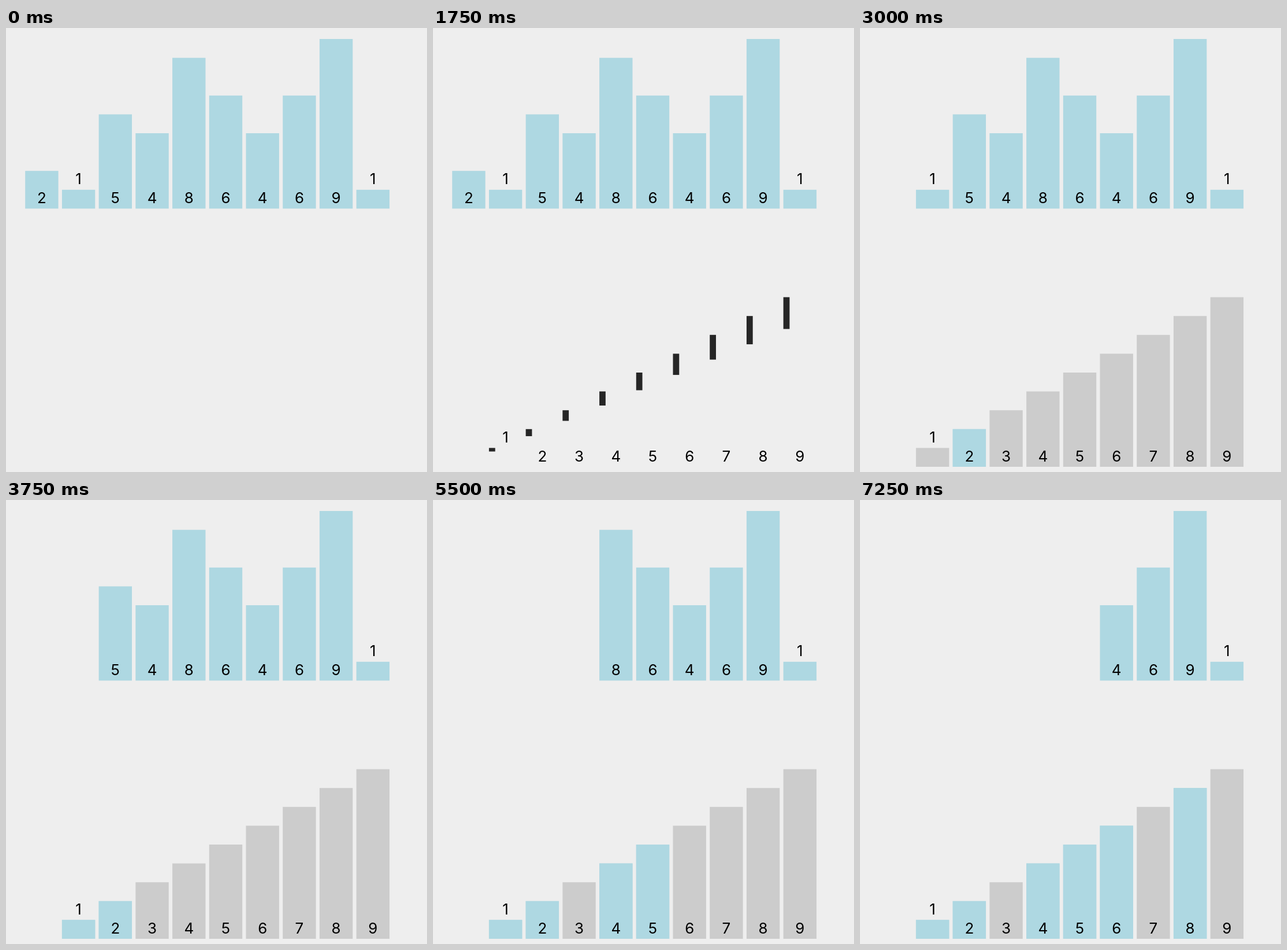
An HTML page for the animation above (8 s loop, 729 by 768 pixels).

```html
<!DOCTYPE html>
<html lang="en">
<head>
<meta charset="utf-8">
<title>Counting bars</title>
<style>
  html, body { margin: 0; width: 729px; height: 768px; overflow: hidden; background: #eee; }
  svg { display: block; }
  text { font: 26px Inter, Roboto, sans-serif; text-anchor: middle; fill: #000; }
</style>
</head>
<body>
<svg id="stage" width="729" height="768" viewBox="0 0 729 768"></svg>
<script>
const LOOP = 8000, STEP = 250;
const LEFT = 33.2, PITCH = 63.72, WIDTH = 57.4, UNIT = 32.6;
const TOP_BASE = 312.4, BOTTOM_BASE = 759;
const BLUE = '#aed8e2', GRAY = 204;
const values = [2, 1, 5, 4, 8, 6, 4, 6, 9, 1];
const grow = [1613, 380];
// start and duration of each bar's drop into its slot, left to right
const drops = [[2500, 306], [3381, 306], [4242, 306], [5113, 306], [6001, 295], [6884, 306]];

const stage = document.getElementById('stage');
const add = (parent, tag) =>
  parent.appendChild(document.createElementNS('http://www.w3.org/2000/svg', tag));
const set = (el, attrs) => {
  for (const name in attrs) el.setAttribute(name, attrs[name]);
};
const show = (el, on) => set(el, { visibility: on ? 'visible' : 'hidden' });
const ease = t => t < 0.5 ? 4 * t ** 3 : 1 - 4 * (1 - t) ** 3;
const phase = (time, [start, duration]) =>
  Math.min(1, Math.max(0, (time - start) / duration));
const mix = (a, b, p) => a + (b - a) * p;
const slotX = i => LEFT + PITCH * i;

const slotLayer = add(stage, 'g'), barLayer = add(stage, 'g'), labelLayer = add(stage, 'g');

function makeBar(layer, value, index, base) {
  const rect = add(layer, 'rect');
  set(rect, {
    x: slotX(index), y: base - value * UNIT,
    width: WIDTH, height: value * UNIT, fill: BLUE
  });
  const label = add(labelLayer, 'text');
  set(label, {
    x: slotX(index) + WIDTH / 2,
    y: base - 9.4 - (value === 1 ? UNIT : 0)
  });
  label.textContent = value;
  return { rect, label, value, index };
}

const bars = values.map((v, i) => makeBar(barLayer, v, i, TOP_BASE));
const slots = Array.from({ length: 9 }, (_, i) => makeBar(slotLayer, i + 1, i + 1, BOTTOM_BASE));

function render(time) {
  const size = ease(phase(time, grow));
  const shade = Math.round(GRAY * size);
  for (const { rect, label, value } of slots) {
    show(rect, size > 0);
    show(label, size > 0);
    set(rect, {
      width: WIDTH * size, height: value * UNIT * size,
      fill: `rgb(${shade},${shade},${shade})`
    });
  }
  bars.forEach(({ rect, label, value, index }, i) => {
    const t = drops[i] ? phase(time, drops[i]) : 0;
    const p = ease(t);
    set(rect, {
      x: mix(slotX(index), slotX(value), p),
      y: mix(TOP_BASE, BOTTOM_BASE, p) - value * UNIT
    });
    show(label, time < (drops[i] ? drops[i][0] : LOOP));
    if (t > 0.6) set(slots[value - 1].rect, { fill: BLUE });
  });
}

const origin = performance.now();
function tick() {
  const time = (performance.now() - origin) % LOOP;
  render(Math.floor(time / STEP) * STEP);
  requestAnimationFrame(tick);
}
tick();
</script>
</body>
</html>
```
